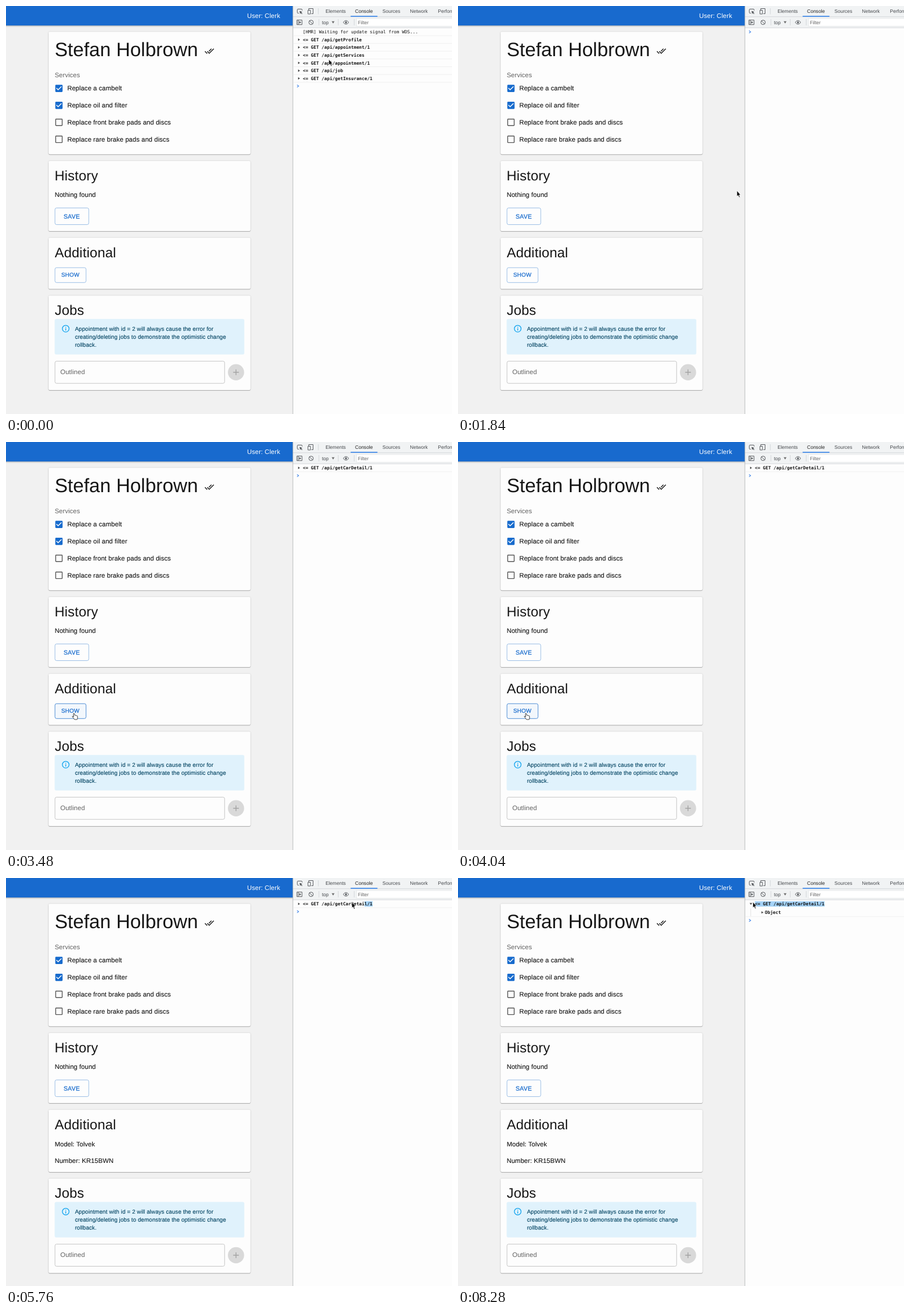
Recreate the animation shown at these times as an HTML page. Size 782 px wide and 716 px high, loop 8400 ms.

```html
<!DOCTYPE html>
<html lang="en">
<head>
<meta charset="utf-8">
<title>Appointment page with console</title>
<style>
html, body { margin: 0; width: 100%; height: 100%; overflow: hidden; background: #f1f1f1; }
svg { display: block; width: 782px; height: 716px; }
text { font-family: "Liberation Sans", Arial, sans-serif; fill: #161616; white-space: pre; text-rendering: geometricPrecision; }
.h3 { font-size: 34px; }
.h4 { font-size: 24.14px; letter-spacing: .00735em; }
.body { font-size: 11.36px; letter-spacing: .00938em; stroke: #161616; stroke-width: .12; }
.small { font-size: 9.94px; letter-spacing: .01071em; fill: #014361; stroke: #014361; stroke-width: .12; }
.btn { letter-spacing: .02857em; fill: #176bcd; stroke: #176bcd; stroke-width: .25; }
.muted { fill: #606060; stroke: none; }
.tool { font-size: 8.52px; fill: #45484c; }
.mono { font: 7.81px "DejaVu Sans Mono", monospace; }
.bold { font-weight: bold; }
.card { fill: #fdfdfd; filter: drop-shadow(0 1px .6px rgba(0,0,0,.24)) drop-shadow(0 .6px 1px rgba(0,0,0,.16)); }
.bar { fill: #186ace; filter: drop-shadow(0 1.2px 1.2px rgba(0,0,0,.3)); }
.icon { fill: none; stroke: #55585c; stroke-width: 1; }
.rule { stroke: #cdd0d4; stroke-width: .8; }
</style>
</head>
<body>
<svg id="stage" viewBox="0 0 782 716"></svg>
<script>
const LOOP = 8400, STEP = 40;
const CLEAR = 680, LOG = 3240, LOADED = 4080, EXPAND = 6480;
const CHAR = 4.702, LOG_X = 520.5, LOG_CHARS = 26;
const BLUE = '#176bcd';

const text = (x, y, cls, s, extra = '') => `<text x="${x}" y="${y}" class="${cls}" ${extra}>${s}</text>`;
const rect = (x, y, w, h, attrs) => `<rect x="${x}" y="${y}" width="${w}" height="${h}" ${attrs}/>`;
const card = (y, h, id = '') => rect(74.5, y, 354.3, h, `rx="2.8" class="card" ${id && `id="${id}"`}`);
const glyph = (x, y, k, fill, d) => `<path transform="translate(${x} ${y}) scale(${k})" fill="${fill}" d="${d}"/>`;
const icon = d => `<path class="icon" d="${d}"/>`;
const rule = (x1, y1, x2, y2, color = '#cdd0d4') =>
  `<path class="rule" style="stroke:${color}" d="M${x1} ${y1}L${x2} ${y2}"/>`;

const TICKED = 'M19 3H5c-1.11 0-2 .9-2 2v14c0 1.1.89 2 2 2h14c1.11 0 2-.9 2-2V5c0-1.1-.89-2-2-2zm-9 14l-5-5 1.41-1.41L10 14.17l7.59-7.59L19 8l-9 9z';
const EMPTY = 'M19 5v14H5V5h14m0-2H5c-1.1 0-2 .9-2 2v14c0 1.1.9 2 2 2h14c1.1 0 2-.9 2-2V5c0-1.1-.9-2-2-2z';
const DONE_ALL = 'm18 7-1.41-1.41-6.34 6.34 1.41 1.41L18 7zm4.24-1.41L11.66 16.17 7.48 12l-1.41 1.41L11.66 19l12-12-1.42-1.41zM.41 13.41 6 19l1.41-1.41L1.83 12 .41 13.41z';
const INFO = 'M11 9h2V7h-2M12 20a8 8 0 0 1 0-16a8 8 0 0 1 0 16M12 2a10 10 0 0 0 0 20a10 10 0 0 0 0-20M11 17h2v-6h-2z';
const PLUS = 'M19 13h-6v6h-2v-6H5v-2h6V5h2v6h6v2z';

function checkbox(label, i) {
  const y = 144.4 + i * 29.8, on = i < 2;
  return glyph(84.3, y - 8.4, .71, on ? BLUE : '#555', on ? TICKED : EMPTY) + text(107.4, y + 3.8, 'body', label);
}

function page() {
  return rect(0, 0, 503, 716, 'fill="#f1f1f1"') + rect(-5, -5, 515, 39.2, 'class="bar"') +
    text(422.7, 21.1, 'body', 'User: Clerk', 'style="fill:#fff;stroke:none"') +
    card(45.3, 215) + text(85.4, 88, 'h3', 'Stefan Holbrown') +
    glyph(348, 70.5, .71, '#161616', DONE_ALL) + text(85.4, 124.9, 'body muted', 'Services') +
    ['Replace a cambelt', 'Replace oil and filter', 'Replace front brake pads and discs',
      'Replace rare brake pads and discs'].map(checkbox).join('') +
    card(271.9, 123.2) + text(85.2, 305.8, 'h4', 'History') + text(85.4, 335, 'body', 'Nothing found') +
    rect(85.9, 354.4, 59.2, 29.2, 'rx="2.8" fill="none" stroke="#8fb7e4" stroke-width=".9"') +
    text(100.9, 372.6, 'btn', 'SAVE', 'font-size="10.65"') +
    card(406.7, 89.9, 'extra') + text(85.4, 440.5, 'h4', 'Additional') +
    `<g id="show">` + rect(85.9, 459.2, 54.4, 26.1, 'id="showBox" rx="2.8" stroke-width=".9"') +
    text(96.9, 475.4, 'btn', 'SHOW', 'font-size="9.94"') + `</g>` +
    `<g id="details">` + text(85.4, 471.1, 'body', 'Model: Tolvek') +
    text(85.4, 499.5, 'body', 'Number: KR15BWN') + `</g>` +
    `<g id="jobs">` + card(508.2, 165.8) + text(85.4, 542.1, 'h4', 'Jobs') +
    rect(85.4, 549.2, 332.4, 62.3, 'rx="2.8" fill="#e0f2fc"') + glyph(96.9, 558.4, .651, '#0fa3ee', INFO) +
    ['Appointment with id = 2 will always cause the error for',
      'creating/deleting jobs to demonstrate the optimistic change', 'rollback.']
      .map((s, i) => text(120.9, 569.7 + i * 14.2, 'small', s)).join('') +
    rect(85.9, 623.3, 297.4, 38.9, 'rx="2.8" fill="none" stroke="#bfbfbf" stroke-width=".9"') +
    text(95.2, 645.8, 'body muted', 'Outlined') +
    `<circle cx="403.3" cy="642.8" r="14.2" fill="#d9d9d9"/>` + glyph(394.8, 634.3, .71, '#a3a3a3', PLUS) + `</g>`;
}

function toolbar() {
  const tabs = [[560.3, 'Elements'], [612, 'Console'], [660, 'Sources'], [708.3, 'Network'], [757.3, 'Performance']];
  return rect(503, 0, 279, 716, 'fill="#fdfdfd"') + rect(503, 0, 279, 38.2, 'fill="#f1f3f4"') +
    rule(503, 18.8, 782, 18.8) + rule(503, 38.2, 782, 38.2) +
    icon('M513.5 12.6H512a1.2 1.2 0 0 1-1.2-1.2V6.6a1.2 1.2 0 0 1 1.2-1.2h6a1.2 1.2 0 0 1 1.2 1.2V8') +
    `<path d="M514.6 8.4l5.2 2-2.1.9 2 2.1-.9.9-2-2.1-.9 2.1z" fill="#55585c"/>` +
    icon('M530.8 7V4.5h7.6V13.5H535.5M529.4 7.5h4.4v6.5h-4.4z') + rule(547.6, 4, 547.6, 14.5) +
    tabs.map(([x, s]) => text(x, 12.2, 'tool', s, s === 'Console' ? 'style="fill:#222"' : '')).join('') +
    rect(604.3, 17.4, 47, 1.4, 'fill="#1a73e8"') +
    icon('M510 24.7h9v8h-9zM512.3 24.7v8') + `<path d="M514 26.5l3.6 2.2-3.6 2.2z" fill="#55585c"/>` +
    icon('M538.8 28.7a3.9 3.9 0 1 1-7.8 0a3.9 3.9 0 1 1 7.8 0M532.2 26l5.5 5.5') +
    rule(548.7, 23, 548.7, 34) + text(554, 31.7, 'tool', 'top') +
    `<path d="M571 26.8h5l-2.5 4z" fill="#6e6e6e"/>` + rule(582.5, 23, 582.5, 34) +
    icon('M591.2 28.7q4.9-6.4 9.8 0q-4.9 6.4-9.8 0z') + `<circle cx="596.1" cy="28.7" r="1.7" fill="#55585c"/>` +
    rule(610.5, 23, 610.5, 34) + rect(614.5, 22, 170, 13.5, 'fill="#fff" stroke="#dcdfe2" stroke-width=".6"') +
    text(617, 32, 'tool', 'Filter', 'style="fill:#666"') + rule(503, 0, 503, 716, '#a9abae');
}

const triangle = (x, y) => `<path d="M${x} ${y - 2.2}l3.6 2.2-3.6 2.2z" fill="#555"/>`;
const divider = y => rule(503.5, y, 782, y, '#ececec');
const entry = (y, s) => triangle(512, y) + text(LOG_X, y + 2.8, 'mono bold', s) + divider(y + 6.7);

function consoleRows() {
  const calls = ['getProfile', 'appointment/1', 'getServices', 'appointment/1', 'job', 'getInsurance/1'];
  return `<g id="oldLog">` + text(LOG_X, 48.2, 'mono', '[HMR] Waiting for update signal from WDS...') + divider(52.1) +
    calls.map((c, i) => entry(59 + i * 13.62, '&lt;= GET /api/' + c)).join('') + `</g>` +
    `<g id="newLog"><rect id="selection" y="40.8" height="9.4" fill="#a4d2f7"/>` +
    text(LOG_X, 48.2, 'mono bold', '&lt;= GET /api/getCarDetail/1') +
    `<g id="closed">` + triangle(512, 45.4) + divider(52.1) + `</g>` +
    `<g id="open"><path d="M511.3 43.7h4.6l-2.3 3.6z" fill="#555"/>` + rule(513.2, 53.5, 513.2, 67, '#dcdcdc') +
    triangle(532, 60.4) + text(538, 63.2, 'mono bold', 'Object') + divider(67.8) + `</g></g>` +
    `<path id="prompt" d="M510.4-2.1l2.7 2.1-2.7 2.1" fill="none" stroke="#3b82e8" stroke-width="1.1"/>`;
}

const pointer = `<g id="pointer" stroke="#fff" stroke-width=".8" stroke-linejoin="round">
  <path id="arrow" d="M0-.5V9.8L2.2 7.8L3.9 11.6L5.5 10.9L3.9 7.2H6.7Z" fill="#000"/>
  <path id="hand" d="M-.9 1.2q.9-1.3 1.8 0l1.1 3.3q.9-.7 1.5.1q1-.5 1.5.4q1.3-.3 1.4 1l.2 2.8l-.9 2.7h-4.6l-1.8-2.5l-2.3-2.7q.5-1.2 1.8-.2l1 .8z" fill="#fff" stroke="#111"/></g>`;

document.getElementById('stage').innerHTML = page() + toolbar() + consoleRows() + pointer;
const el = {};
document.querySelectorAll('[id]').forEach(n => el[n.id] = n);

// start, end, target x, target y, linear?
const moves = [
  [80, 560, 537, 24], [1040, 1200, 489, 324.5], [1840, 2400, 341, 427.5], [2800, 3120, 119, 475.5],
  [4640, 5040, 592, 90.5], [5080, 5480, 647, 43], [5560, 6200, 517, 42.5, true]
];

function pointerAt(t) {
  let x = 566, y = 94;
  for (const [a, b, tx, ty, linear] of moves) {
    if (t <= a) break;
    const p = Math.min(1, (t - a) / (b - a));
    const k = linear ? p : p * p * (3 - 2 * p);
    x += (tx - x) * k;
    y += (ty - y) * k;
  }
  return [x, y];
}

// Characters left of the selection; the highlight trails the pointer.
function selectionStart(t) {
  if (t < 5600) return LOG_CHARS;
  const n = Math.round((pointerAt(t - 110)[0] - LOG_X) / CHAR);
  return Math.max(0, Math.min(LOG_CHARS, n));
}

const show = (node, on) => node.setAttribute('visibility', on ? 'inherit' : 'hidden');

function draw(time) {
  const t = Math.floor((time % LOOP) / STEP) * STEP;
  const [x, y] = pointerAt(t);
  const loaded = t >= LOADED, logged = t >= LOG, open = t >= EXPAND;
  const hover = !loaded && x > 86 && x < 140 && y > 459 && y < 485;

  show(el.oldLog, t < CLEAR);
  show(el.newLog, logged);
  show(el.closed, logged && !open);
  show(el.open, open);
  const promptY = t < CLEAR ? 140.5 : open ? 74.4 : logged ? 59 : 45.4;
  el.prompt.setAttribute('transform', `translate(0 ${promptY})`);

  const first = selectionStart(t);
  el.selection.setAttribute('x', LOG_X + first * CHAR);
  el.selection.setAttribute('width', (LOG_CHARS - first) * CHAR);

  show(el.show, !loaded);
  show(el.details, loaded);
  el.extra.setAttribute('height', loaded ? 109.2 : 89.9);
  el.jobs.setAttribute('transform', `translate(0 ${loaded ? 19.2 : 0})`);
  el.showBox.setAttribute('fill', hover ? '#f2f7fc' : 'none');
  el.showBox.setAttribute('stroke', hover ? '#3a80d2' : '#8fb7e4');

  el.pointer.setAttribute('transform', `translate(${x} ${y})`);
  show(el.arrow, !hover);
  show(el.hand, hover);
}

const begin = performance.now();
function tick() {
  draw(performance.now() - begin);
  requestAnimationFrame(tick);
}
tick();
</script>
</body>
</html>
```
